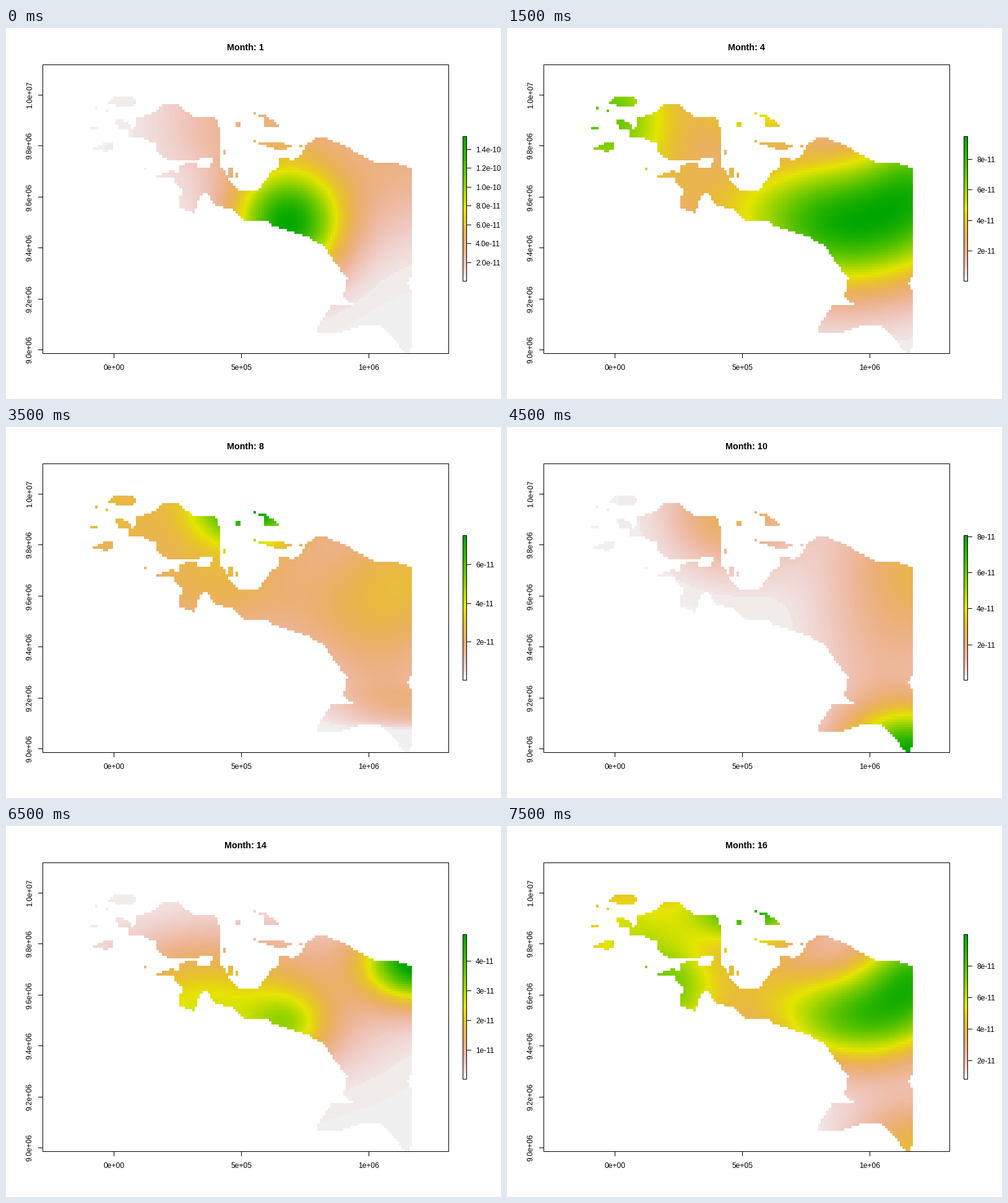
A matplotlib script for the animation above (8 s loop, 800 by 600 pixels).

```python
import colorsys

import matplotlib.pyplot as plt
import numpy as np
from matplotlib.animation import FuncAnimation
from matplotlib.patches import Rectangle
from matplotlib.path import Path

plt.rcParams["font.family"] = "Liberation Sans"
W, H, DPI = 800, 600, 100
LEFT, RIGHT, TOP, BOTTOM = 136, 656, 111, 526
COLS, ROWS = 126, 101
BAR_X, BAR_TOP, BAR_BOTTOM = 738.5, 175.5, 409.5


def px(size):
    return size * 72 / DPI


# ---- colours: terrain palette, pale grey up to green ----
def terrain(t):
    if t < 0.5:
        u = 2 * t
        return colorsys.hsv_to_rgb(u / 6, u, 0.95 - 0.05 * u)
    u = 2 * t - 1
    return colorsys.hsv_to_rgb((1 + u) / 6, 1, 0.9 - 0.25 * u)


palette = np.array([terrain(i / 254) for i in range(255)])
palette[:3] = 240 / 255
palette[3:8] = np.array([241, 236, 234]) / 255

# ---- land: key points of the coast, cut into square cells ----
east = [(385, 264), (405, 264), (430, 232), (440, 226), (444, 209), (463, 213),
        (480, 204), (481, 190), (496, 184), (498, 177), (517, 177), (545, 190),
        (587, 212), (597, 217), (635, 219), (657, 228), (657, 400), (648, 413),
        (657, 427), (657, 506), (652, 526), (645, 524), (603, 479), (575, 481),
        (546, 491), (502, 493), (502, 484), (527, 447), (560, 446), (545, 434),
        (551, 405), (533, 380), (513, 353), (492, 340), (433, 320), (425, 314),
        (385, 311)]
neck = [(386, 264), (386, 311), (364, 292), (340, 288), (322, 266), (311, 278),
        (311, 290), (298, 297), (279, 290), (284, 262), (270, 243), (241, 241),
        (267, 231), (279, 234), (281, 224), (292, 219), (310, 219), (312, 228),
        (330, 228), (338, 190), (345, 180), (347, 222), (359, 243), (376, 261)]
head = [(254, 125), (279, 125), (303, 144), (338, 144), (346, 163), (346, 179),
        (338, 208), (310, 212), (262, 212), (246, 204), (242, 187), (214, 175),
        (196, 176), (197, 166), (208, 162), (209, 147), (242, 136)]
islands = [
    [(174, 111), (204, 111), (212, 116), (212, 124), (190, 129), (166, 121)],
    [(174, 147), (187, 147), (200, 156), (200, 164), (184, 164)],
    [(158, 185), (174, 187), (174, 194), (162, 201), (140, 196)],
    [(396, 136), (418, 140), (443, 158), (443, 162), (418, 162), (417, 147)],
    [(410, 184), (434, 184), (463, 189), (463, 193), (440, 198), (410, 188)],
    [(371, 151), (380, 151), (380, 160), (371, 158)],
    [(359, 224), (367, 224), (367, 244), (359, 244)],
]
islets = [(146, 131), (163, 134), (138, 163), (142, 163), (146, 163), (226, 230),
          (403, 182), (305, 299), (352, 200), (352, 204), (374, 236), (374, 240),
          (477, 191)]

cell_w, cell_h = (RIGHT - LEFT) / COLS, (BOTTOM - TOP) / ROWS
gx, gy = np.meshgrid(LEFT + (np.arange(COLS) + 0.5) * cell_w,
                     TOP + (np.arange(ROWS) + 0.5) * cell_h)
centres = np.column_stack([gx.ravel(), gy.ravel()])
land = np.zeros((ROWS, COLS), bool)
for shape in [east, neck, head] + islands:
    land |= Path(shape).contains_points(centres).reshape(land.shape)
for x, y in islets:
    land[int((y - TOP) / cell_h), int((x - LEFT) / cell_w)] = True


# ---- monthly surfaces: sums of Gaussian hills (x, y, rx, ry, height) ----
def hills(*parts):
    return sum(h * np.exp(-((gx - x) / rx) ** 2 / 2 - ((gy - y) / ry) ** 2 / 2)
               for x, y, rx, ry, h in parts)


def mix(a, b, w, west=True, south=True):
    """Blend two surfaces; optionally fade out the west or the south."""
    v = a + (b - a) * w
    if not west:
        v = v * np.clip((gx - 205) / 60, 0, 1)
    if not south:
        v = v * np.clip((490 - gy) / 60, 0, 1)
    return v / v[land].max()


m1 = hills((455, 318, 62, 62, 0.95), (640, 215, 110, 85, 0.2),
           (400, 150, 100, 75, 0.2))
m3 = hills((545, 318, 120, 75, 1), (670, 235, 60, 75, 0.6),
           (150, 150, 90, 90, 0.65))
m6 = hills((160, 130, 100, 100, 0.42), (405, 130, 62, 40, 0.85),
           (340, 270, 95, 60, 0.3), (555, 293, 95, 80, 0.2))
m10 = hills((650, 535, 75, 55, 1), (680, 225, 100, 90, 0.34),
            (600, 380, 70, 70, 0.1), (365, 135, 70, 62, 0.33))
m12 = hills((150, 150, 80, 80, 0.4), (435, 160, 55, 58, 0.87),
            (440, 300, 72, 70, 0.46), (640, 215, 90, 70, 0.25))
m14 = hills((670, 218, 60, 45, 1.05), (300, 300, 100, 75, 0.47),
            (480, 270, 110, 80, 0.2), (455, 325, 45, 40, 0.35))
m16 = hills((185, 170, 85, 90, 0.5), (265, 275, 55, 60, 0.5),
            (395, 130, 70, 38, 0.85), (400, 250, 70, 70, 0.25),
            (565, 310, 90, 55, 0.75), (665, 235, 60, 60, 0.7),
            (660, 530, 70, 60, 0.38))

# surface, then the legend's low and high end in units of 1e-11
months = [
    (m1, 0.03, 15.37),
    (mix(m1, m3, 0.5, west=False, south=False), 0, 11),
    (m3, 0.1, 10.67),
    (mix(m3, m6, 0.4), 0.03, 9.5),
    (mix(m6, m16, 0.35), 0.03, 13),
    (m6, 0.03, 9.9),
    (mix(m6, m10, 0.3, south=False), 0.03, 8.6),
    (mix(m6, m10, 0.5, south=False), 0.03, 7.5),
    (mix(m6, m10, 0.75, west=False, south=False), 0.03, 12.8),
    (m10, 0.03, 8.07),
    (mix(m10, m12, 0.5, west=False), 0.03, 9),
    (m12, 0.03, 11.74),
    (mix(m14, m10, 0.4, west=False), 0.03, 6.8),
    (m14, 0.03, 4.9),
    (mix(m14, m16, 0.5, west=False), 0.03, 7.4),
    (m16, 0.83, 9.98),
]


def picture(surface):
    shade = np.round(np.clip(surface, 0, 1) * 254).astype(int)
    return np.dstack([palette[shade], land.astype(float)])


pictures = [picture(m[0]) for m in months]

# ---- stage, in pixels from the top left ----
fig = plt.figure(figsize=(W / DPI, H / DPI), dpi=DPI, facecolor="white")
ax = fig.add_axes([0, 0, 1, 1])
ax.axis("off")


def line(x, y):
    ax.plot(x, y, color="black", lw=px(1), solid_capstyle="butt", snap=False)


def text(x, y, s, size=12, **kw):
    return ax.text(x, y, s, fontsize=px(size), va="baseline",
                   rotation_mode="anchor", **kw)


def frame(x0, y0, x1, y1):
    ax.add_patch(Rectangle((x0, y0), x1 - x0, y1 - y0, fill=False, ec="black",
                           lw=px(1), snap=False, zorder=4))


raster = ax.imshow(pictures[0], extent=(LEFT, RIGHT, BOTTOM, TOP),
                   interpolation="nearest", aspect="auto", zorder=1)
ax.imshow(palette[::-1, None], extent=(BAR_X, BAR_X + 6, BAR_BOTTOM, BAR_TOP),
          interpolation="nearest", aspect="auto", zorder=1)
frame(59.5, 59.5, 715.5, 526.5)
frame(BAR_X, BAR_TOP, BAR_X + 6, BAR_BOTTOM)

for i in range(3):
    x = 174.5 + 206 * i
    line([x, x], [527, 534])
    text(x - 0.5, 553, f"{5e5 * i:.0e}", ha="center")
for i in range(6):
    y = round(108 + 82.4 * i) + 0.5
    line([52, 59], [y, y])
    text(42, y, f"{1e7 - 2e5 * i:.1e}", ha="center", rotation=90)

title = text(387, 36, "", 14.4, ha="center", weight="bold")
marks = ax.hlines([], 745, 752, color="black", lw=px(1), snap=False)
labels = [text(759, 0, "") for _ in range(9)]
ax.set_xlim(0, W)
ax.set_ylim(H, 0)


def draw(i):
    _, low, high = months[i]
    raster.set_data(pictures[i])
    title.set_text(f"Month: {i + 1}")
    step = 2 if high > 7.45 else 1
    ticks = np.arange(np.ceil(low / step) * step, high, step)
    digits = int(any(v > 10 and v % 10 for v in ticks))
    ys = BAR_BOTTOM - (ticks - low) / (high - low) * (BAR_BOTTOM - BAR_TOP)
    ys = np.floor(ys) + 0.5
    marks.set_segments([[(745, y), (752, y)] for y in ys])
    for label in labels:
        label.set_text("")
    for label, v, y in zip(labels, ticks, ys):
        label.set_text(f"{v * 1e-11:.{digits}e}")
        label.set_y(y + 4.5)
    return [raster, title, marks, *labels]


anim = FuncAnimation(fig, draw, frames=len(months), interval=500,
                     repeat=True, repeat_delay=0, blit=False)
plt.show()
```
